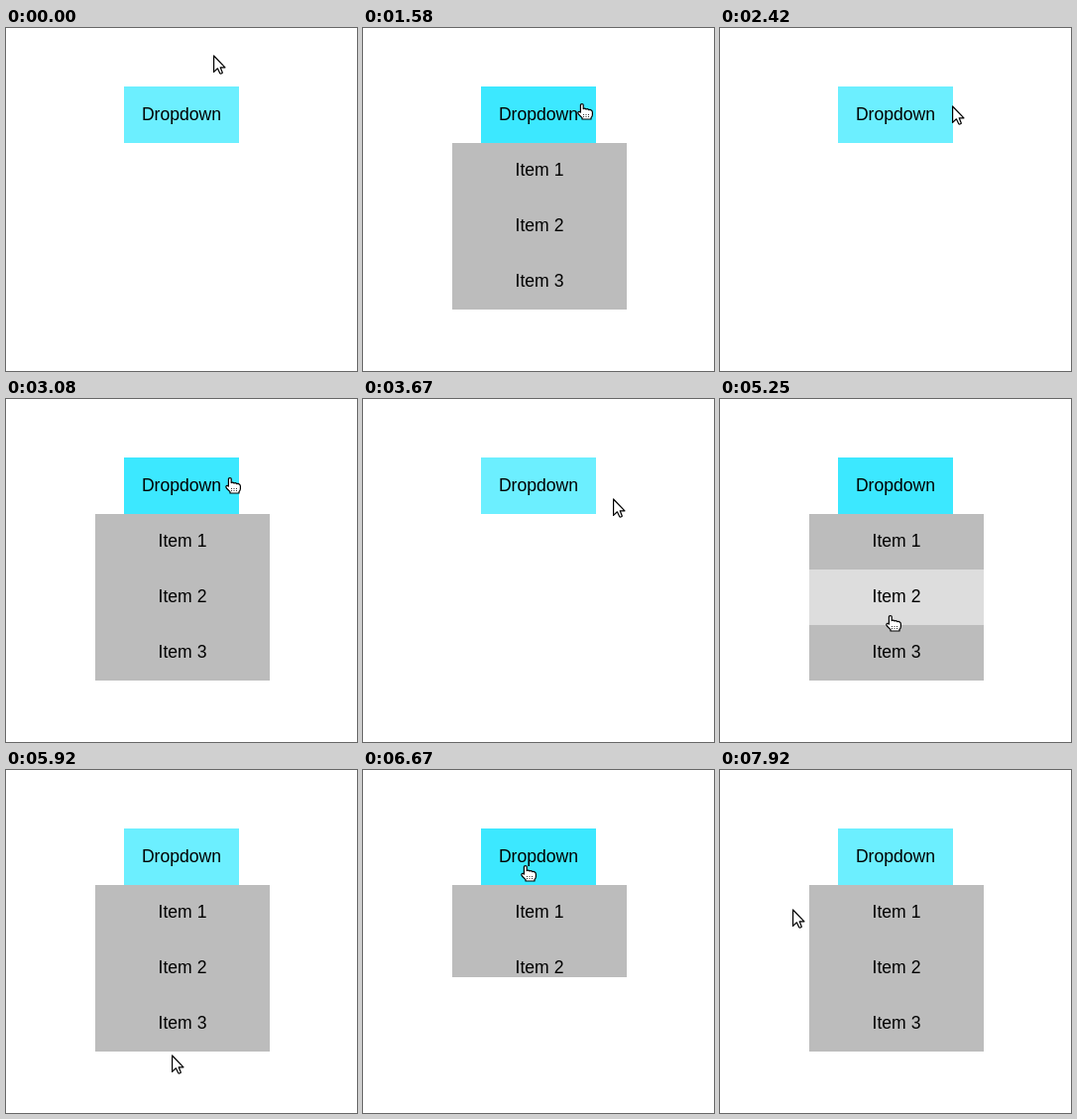
These frames come from a looping animation (354 px wide and 346 px high, 8 s). An HTML page:

```html
<!DOCTYPE html>
<html lang="en">
<head>
<meta charset="utf-8">
<title>Dropdown</title>
<style>
  html, body { margin: 0; width: 100%; height: 100%; overflow: hidden; background: #fff; }
  body { position: relative; font: 17.6px "Liberation Sans", Arial, sans-serif; color: #000; text-align: center; }
  #button, #menu, svg { position: absolute; }
  #button { left: 119px; top: 59px; width: 116px; height: 57px; line-height: 56px; background: #6cefff; }
  #button.over { background: #3ce8ff; }
  #menu { left: 90px; top: 116.1px; width: 176px; overflow: hidden; }
  .item { height: 56.2px; line-height: 54px; background: #bcbcbc; }
  .item.over { background: #ddd; }
  svg { left: 0; top: 0; width: 354px; height: 346px; }
  #arrow, #hand { fill: #fff; stroke: #000; stroke-width: 1.2; stroke-linejoin: round; }
</style>
</head>
<body>
<div id="button">Dropdown</div>
<div id="menu">
  <div class="item">Item 1</div>
  <div class="item">Item 2</div>
  <div class="item">Item 3</div>
</div>
<svg viewBox="0 0 354 346">
  <path id="arrow" d="M.6 1V17.4L4.4 13.8L6.8 18.8Q8 19.6 9.4 18.2L7.2 12.8H12Z"/>
  <g id="hand">
    <path d="M3.4 9V1.8Q3.4 .6 4.8 .6T6.2 1.8V5.6Q7.8 4.6 9 6Q10.6 5.2 11.8 6.6Q13.6 6 14.4 7.2Q15.4 7.6 15.4 9V11.4Q15.4 13 14 14.6V16H5V14.6L1.4 11Q.2 9.4 1.2 8.6Q2.4 8 3.4 9Z"/>
    <path d="M6.5 11V14M9 11V14M11.5 11V14" stroke-width=".8" stroke-dasharray="1 1"/>
  </g>
</svg>
<script>
const LOOP = 8000, FPS = 12, TICKS = LOOP * FPS / 1000;
const MENU_TOP = 116, MENU_H = 168, ITEM_H = 56;
const MAX_H = 500, FADE = 0.3 * FPS; // max-height transition, in ticks

// Pointer glides: start tick, end tick, x, y
const home = [209, 27];
const glides = [
  [6, 11, 205, 85], [15, 19, 221, 76], [19, 23, 252, 80], [25, 33, 216, 76],
  [36, 38, 236, 81], [39, 41, 252, 100], [44, 52, 176, 98], [54, 64, 172, 221],
  [64, 73, 166, 297], [74, 80, 164, 96], [80, 84, 166, 88], [84, 90, 130, 140],
  [90, 95, 73, 140]
];
// Hover spans: enter, leave
const hovers = [[8.6, 20.6], [29.4, 37.6], [46.4, 70.3], [79.46, 93.7]];

const $ = id => document.getElementById(id);
const button = $("button"), menu = $("menu"), arrow = $("arrow"), hand = $("hand");
const items = document.querySelectorAll(".item");

const clamp = v => Math.max(0, Math.min(1, v));
const smooth = v => v * v * (3 - 2 * v);

// CSS "ease": cubic-bezier(.25, .1, .25, 1)
function ease(x) {
  const at = (s, a, b) => 3 * (1 - s) ** 2 * s * a + 3 * (1 - s) * s * s * b + s ** 3;
  let lo = 0, hi = 1;
  for (let i = 0; i < 24; i++) {
    const mid = (lo + hi) / 2;
    if (at(mid, .25, .25) < x) lo = mid; else hi = mid;
  }
  return at(lo, .1, 1);
}

function pointer(n) {
  let [x, y] = home;
  for (const [from, to, tx, ty] of glides) {
    const f = smooth(clamp((n - from) / (to - from)));
    x += (tx - x) * f;
    y += (ty - y) * f;
  }
  return [Math.round(x), Math.round(y)];
}

function menuHeight(n) {
  const span = hovers.filter(h => n >= h[0]).pop();
  if (!span) return 0;
  const [enter, leave] = span;
  const p = n < leave ? ease(clamp((n - enter) / FADE)) : 1 - ease(clamp((n - leave) / FADE));
  return Math.min(MENU_H, Math.round(p * MAX_H));
}

function draw(ms) {
  const n = Math.floor((ms % LOOP + 5) * FPS / 1000) % TICKS;
  const [x, y] = pointer(n);
  const over = hovers.some(([enter, leave]) => n >= enter && n < leave);
  button.classList.toggle("over", over);
  menu.style.height = menuHeight(n) + "px";
  items.forEach((item, i) => {
    item.classList.toggle("over", over && Math.floor((y - MENU_TOP) / ITEM_H) === i);
  });
  arrow.style.display = over ? "none" : "";
  hand.style.display = over ? "" : "none";
  arrow.setAttribute("transform", `translate(${x} ${y})`);
  hand.setAttribute("transform", `translate(${x - 5} ${y})`);
}

const start = performance.now();
function tick() {
  draw(performance.now() - start);
  requestAnimationFrame(tick);
}
draw(0);
requestAnimationFrame(tick);
</script>
</body>
</html>
```
